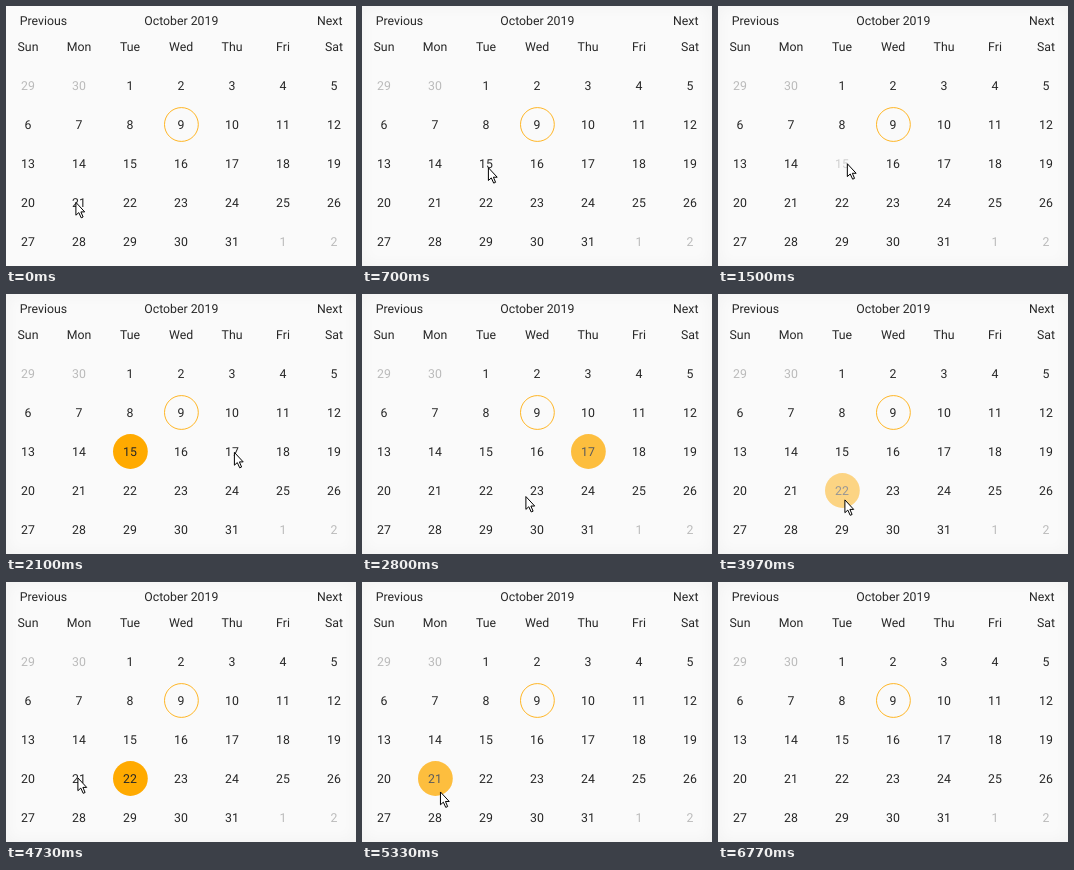
An HTML page for the animation above (7330 ms loop, 350 by 260 pixels).

```html
<!DOCTYPE html>
<html lang="en">
<head>
<meta charset="utf-8">
<title>Calendar</title>
<style>
  html, body { margin: 0; width: 100%; height: 100%; overflow: hidden; background: #fafafa; }
  svg { display: block; width: 350px; height: 260px; }
  text { font: 12.3px Roboto, Arial, sans-serif; fill: #262626; text-anchor: middle;
         text-rendering: geometricPrecision; }
  .muted { fill: #bababa; }
  .edge { position: absolute; left: 0; top: 0; width: 350px; height: 260px;
          box-shadow: inset 0 0 14px 2px rgba(0, 0, 0, .03); }
</style>
</head>
<body>
<svg id="stage" viewBox="0 0 350 260"></svg>
<div class="edge" id="edge"></div>
<script>
const LOOP = 7330;
const FADE = 250;
const DIM = 0.2;
const ORANGE = '#ffaa00';
const stage = document.getElementById('stage');
const edge = document.getElementById('edge');

function add(tag, attrs, parent = stage) {
  const el = document.createElementNS('http://www.w3.org/2000/svg', tag);
  for (const key in attrs) el.setAttribute(key, attrs[key]);
  parent.appendChild(el);
  return el;
}

function label(str, x, y, attrs = {}, parent = stage) {
  add('text', { x, y, ...attrs }, parent).textContent = str;
}

const colX = c => 22 + 51 * c;
const rowY = r => 79.5 + 39 * r;

label('Previous', 13.8, 19.3, { style: 'text-anchor:start' });
label('October 2019', 175.3, 19.3);
label('Next', 336.5, 19.3, { style: 'text-anchor:end' });
['Sun', 'Mon', 'Tue', 'Wed', 'Thu', 'Fri', 'Sat']
  .forEach((name, c) => label(name, colX(c), 45.3));

// The grid starts on September 29.
const days = {};
for (let i = 0; i < 35; i++) {
  const day = i - 1;
  const inMonth = day >= 1 && day <= 31;
  const shown = day < 1 ? day + 30 : day > 31 ? day - 31 : day;
  const x = colX(i % 7), y = rowY(Math.floor(i / 7));
  const group = add('g', {});
  const ring = (r, style) => add('circle', { cx: x + 0.4, cy: y, r, ...style }, group);
  const disc = ring(17.4, { fill: ORANGE, visibility: 'hidden' });
  if (day === 9) ring(16.9, { fill: 'none', stroke: ORANGE, 'stroke-opacity': 0.85 });
  label(shown, x, y + 4.6, inMonth ? {} : { class: 'muted' }, group);
  days[day] = { group, disc };
}

// Each tap dims its day, then the selection changes and the day fades back in.
const taps = [
  { day: 15, press: 1495, release: 1850 },
  { day: 17, press: 2270, release: 2650 },
  { day: 22, press: 3395, release: 3868 },
  { day: 21, press: 4770, release: 5180 },
  { day: 21, press: 5765, release: 6305 }
];

// Pointer strokes between rests; bow bends the path downwards.
const home = { x: 69.5, y: 196 };
const strokes = [
  { start: 100, end: 1000, x: 133, y: 157, bow: 0 },
  { start: 1180, end: 1280, x: 128.5, y: 157.5, bow: 0 },
  { start: 1500, end: 1960, x: 228, y: 158, bow: -9 },
  { start: 2630, end: 3070, x: 125, y: 202, bow: 18 },
  { start: 3800, end: 3950, x: 126.5, y: 205.5, bow: 0 },
  { start: 4050, end: 4730, x: 71.5, y: 195.5, bow: 8 },
  { start: 5030, end: 5200, x: 108, y: 214, bow: 12 },
  { start: 5200, end: 5400, x: 74, y: 204, bow: 12 },
  { start: 6080, end: 6165, x: 39.5, y: 220, bow: 0 }
];

const pointer = add('path', {
  d: 'M.4 .4V13.2L3.3 10.6L5.7 15.8L7.6 15L5.4 9.9H9.2Z',
  fill: '#fff', stroke: '#000', 'stroke-width': 1
});

const clamp = p => Math.min(1, Math.max(0, p));
const easeOut = p => 1 - (1 - p) * (1 - p);
const easeInOut = p => p < 0.5 ? 2 * p * p : 1 - 2 * (1 - p) * (1 - p);

function pointerAt(t) {
  let { x, y } = home;
  for (const s of strokes) {
    const p = easeOut(clamp((t - s.start) / (s.end - s.start)));
    x += (s.x - x) * p;
    y += (s.y - y) * p + s.bow * Math.sin(Math.PI * p);
  }
  return { x, y };
}

function draw(t) {
  let selected = null;
  const opacity = {};
  for (const { day, press, release } of taps) {
    if (t >= release) selected = selected === day ? null : day;
    const fade = easeInOut(clamp((t - release) / FADE));
    if (t >= press) opacity[day] = DIM + (1 - DIM) * fade;
  }
  for (const { day } of taps) {
    days[day].group.setAttribute('opacity', opacity[day] ?? 1);
    days[day].disc.setAttribute('visibility', selected === day ? 'visible' : 'hidden');
  }

  edge.style.visibility = t >= 130 ? 'visible' : 'hidden';

  const { x, y } = pointerAt(t);
  const gone = t > strokes[strokes.length - 1].end;
  pointer.setAttribute('visibility', gone ? 'hidden' : 'visible');
  pointer.setAttribute('transform', `translate(${x} ${y})`);
}

const start = performance.now();
function tick() {
  draw((performance.now() - start) % LOOP);
  requestAnimationFrame(tick);
}
tick();
</script>
</body>
</html>
```
